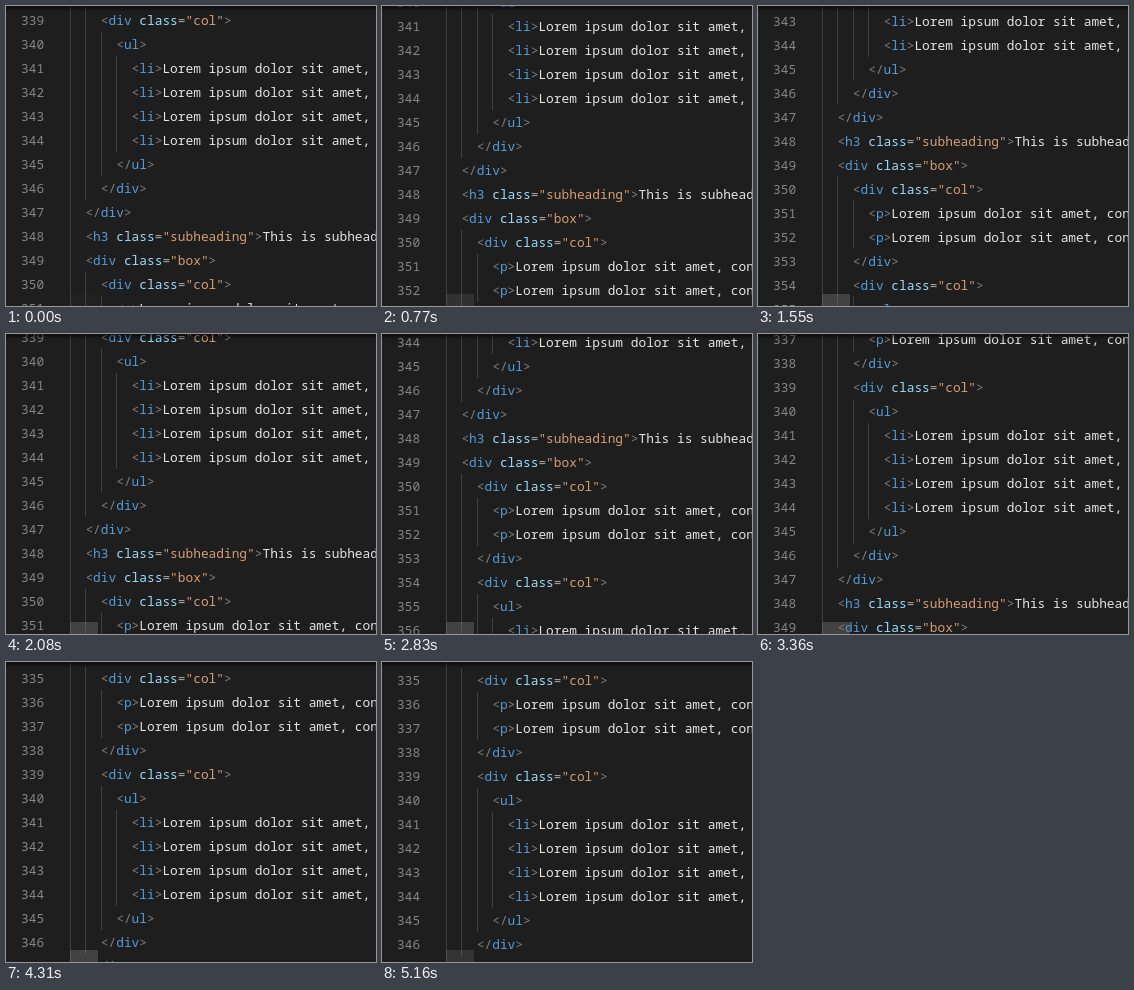
Animation, 370 px wide and 300 px high, one loop 5200 ms. Source, as an HTML page with a canvas:

```html
<!DOCTYPE html>
<html lang="en">
<head>
<meta charset="utf-8">
<title>Smooth scrolling in a code editor</title>
<style>
html, body { margin: 0; width: 100%; height: 100%; overflow: hidden; background: #1e1e1e; }
canvas { display: block; }
</style>
</head>
<body>
<canvas id="stage" width="370" height="300"></canvas>
<script>
const ctx = document.getElementById('stage').getContext('2d');
const LOOP = 5200, LINE = 24, CHAR = 7.7, LEFT = 64, FIRST = 334, LAST = 364;
const FONT = '12.83px "Noto Sans Mono", "DejaVu Sans Mono", monospace';
const GREY = '#808080', BLUE = '#569cd6', SKY = '#9cdcfe', ORANGE = '#d69d75', WHITE = '#e4e4e4';

// Each line: [indent, tokens]; a token is [text, colour]
const open = (indent, tag, cls, text = '') => [indent, [
  ['<', GREY], [tag, BLUE],
  ...(cls ? [[' class', SKY], ['=', '#a8a8a8'], [`"${cls}"`, ORANGE]] : []),
  ['>', GREY], [text, WHITE]
]];
const close = (indent, tag) => [indent, [['</', GREY], [tag, BLUE], ['>', GREY]]];
const lorem = 'Lorem ipsum dolor sit amet, consectetur';
const item = open(8, 'li', '', lorem), para = open(6, 'p', '', lorem);
const box = [
  open(2, 'div', 'box'),
  open(4, 'div', 'col'), para, para, close(4, 'div'),
  open(4, 'div', 'col'), open(6, 'ul'), item, item, item, item, close(6, 'ul'), close(4, 'div'),
  close(2, 'div')
];
const lines = [
  ...box,
  open(2, 'h3', 'subheading', 'This is subheading'),
  ...box,
  close(0, 'div'),
  [0, []]
];

// Wheel bursts: [start, time from first to last notch, notches]; negative scrolls down
const bursts = [
  [720, 325, -7], [1400, 165, 7], [2080, 150, -6],
  [2710, 182, 7], [3360, 180, -6], [3990, 240, 7]
];
const notches = bursts.flatMap(([start, span, n]) => {
  const count = Math.abs(n);
  return Array.from({ length: count }, (_, i) => [start + span * i / (count - 1), 50 * Math.sign(n)]);
});

// Each notch restarts an ease-out-cubic from the current position, 10 ms in
const ease = (from, to, age) => {
  const left = Math.max(0, 1 - (age + 10) / 135);
  return to + (from - to) * left ** 3;
};

function scrollAt(t) {
  let from = 0, to = 0, begun = -1000;
  for (const [at, step] of notches) {
    if (at > t) break;
    from = ease(from, to, at - begun);
    to += step;
    begun = at;
  }
  return Math.round(ease(from, to, t - begun));
}

function thumbAlpha(t) {
  if (t < 720) return Math.max(0, (70 - t) / 800);
  return Math.min(1, (t - 720) / 100, 1 - (t - 4840) / 800);
}

function write(text, x, y, colour) {
  ctx.fillStyle = colour;
  ctx.fillText(text, x, y);
}

function rect(x, y, w, h, colour) {
  ctx.fillStyle = colour;
  ctx.fillRect(x, y, w, h);
}

function drawLine(number, indent, tokens, top) {
  const current = number === LAST;
  if (current) {
    rect(LEFT, top, 306, 2, '#282828');
    rect(LEFT, top + LINE - 2, 306, 2, '#282828');
  }
  for (let col = 0; col < indent; col += 2) {
    rect(Math.round(LEFT + col * CHAR), top, 1, LINE, '#404040');
  }
  ctx.font = (current ? 'bold ' : '') + FONT;
  write(number, 15, top + 17, current ? '#dcdcdc' : '#858585');
  ctx.font = FONT;
  let col = indent;
  for (const [text, colour] of tokens) {
    write(text, LEFT + col * CHAR, top + 17, colour);
    col += text.length;
  }
}

const shadow = ctx.createLinearGradient(0, 0, 0, 6);
shadow.addColorStop(0, 'rgba(0,0,0,.6)');
shadow.addColorStop(1, 'rgba(0,0,0,0)');

function draw() {
  const t = performance.now() % LOOP;
  const origin = 2 + scrollAt(t) - (339 - FIRST) * LINE;
  rect(0, 0, 370, 300, '#1e1e1e');
  lines.forEach(([indent, tokens], i) => {
    const top = origin + i * LINE;
    if (top > -LINE && top < 300) drawLine(FIRST + i, indent, tokens, top);
  });
  rect(0, 0, 370, 6, shadow);
  rect(LEFT, 288, 28, 12, `rgba(121,121,121,${0.4 * thumbAlpha(t)})`);
  requestAnimationFrame(draw);
}
draw();
</script>
</body>
</html>
```
